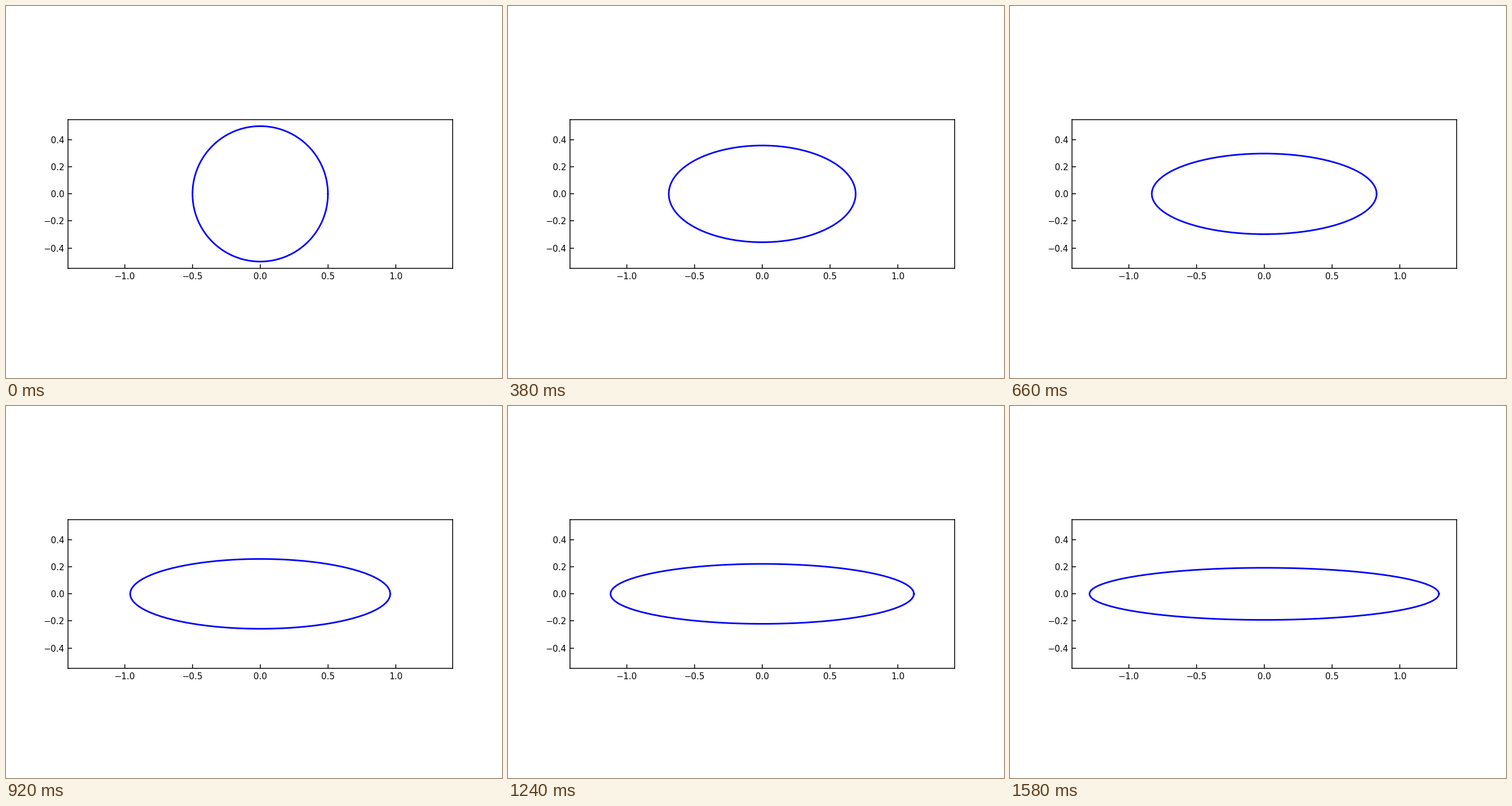
Recreate the animation shown at these times as a matplotlib script. Size 864 px wide and 648 px high, loop 1.6 s.

```python
import numpy as np
import matplotlib.pyplot as plt
from matplotlib.animation import ArtistAnimation

FRAMES = 80
INTERVAL = 20
RADIUS = 0.5
STEP = 0.01

plt.rcParams.update({
    "font.family": "DejaVu Sans",
    "font.size": 8,
    "xtick.direction": "in",
    "ytick.direction": "in",
})

theta = np.linspace(0, 2 * np.pi, 99)


def ellipse(i):
    """Stretch along x while the height shrinks in inverse proportion."""
    a = RADIUS + STEP * i
    b = RADIUS**2 / (a + STEP) if i else RADIUS
    return a * np.cos(theta), b * np.sin(theta)


fig, ax = plt.subplots(figsize=(6.4, 4.8), dpi=135)
ax.set_aspect("equal")

# The axes limits follow from all the curves together.
curves = [ax.plot(*ellipse(i), color="blue", lw=1.5) for i in range(FRAMES)]

anim = ArtistAnimation(fig, curves, interval=INTERVAL,
                       repeat=True, repeat_delay=0)
plt.show()
```
